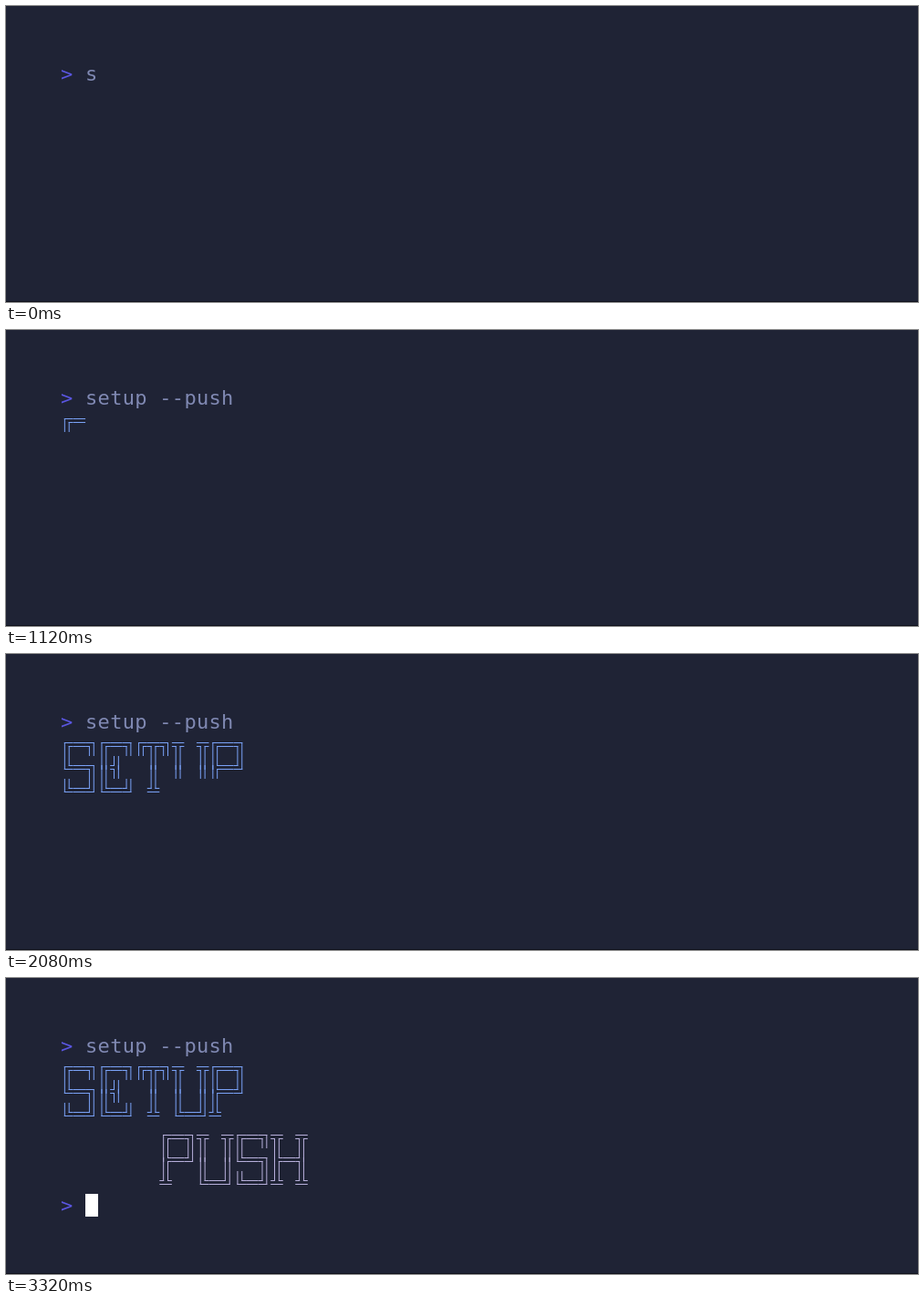
Recreate the animation shown at these times as an HTML page with a canvas. Size 1000 by 325 pixels, loop 6000 ms.

```html
<!DOCTYPE html>
<html lang="en">
<head>
<meta charset="utf-8">
<title>Terminal: setup --push</title>
<style>
  html, body { margin: 0; width: 100%; height: 100%; overflow: hidden; background: #1f2335; }
  canvas { display: block; }
</style>
</head>
<body>
<canvas id="stage" width="1000" height="325"></canvas>
<script>
const ctx = document.getElementById('stage').getContext('2d');
const LOOP = 6000, FRAME = 40;
const LEFT = 60, TOP = 62, CELL_W = 13.54, CELL_H = 25;
const COLORS = {
  background: '#1f2335', edge: '#10121c', prompt: '#5a56e0',
  text: '#8089b3', cursor: '#ffffff', setup: '#7aa2f7', push: '#b8b0dc'
};
const COMMAND = 'setup --push';
const OUTPUT_START = 1120, OUTPUT_END = 3320, CHAR_TIME = 24.86;

const BANNER = [
  '╔═╗╔═╗╔╦╗╦ ╦╔═╗',
  '╚═╗║╣  ║ ║ ║╠═╝',
  '╚═╝╚═╝ ╩ ╚═╝╩  ',
  '\t╔═╗╦ ╦╔═╗╦ ╦',
  '\t╠═╝║ ║╚═╗╠═╣',
  '\t╩  ╚═╝╚═╝╩ ╩'
];
const ARMS = {
  '═': 'LR', '║': 'UD', '╔': 'RD', '╗': 'LD', '╚': 'UR', '╝': 'UL',
  '╦': 'LRD', '╩': 'LRU', '╠': 'UDR', '╣': 'UDL'
};

// Output in printing order; a tab or line break takes one character's time.
const printed = BANNER.flatMap((line, i) => {
  let col = 0;
  return [...line, '\n'].map(char => {
    const item = { char, col, row: i + 1, color: i < 3 ? COLORS.setup : COLORS.push };
    col += char === '\t' ? 8 : 1;
    return item;
  });
});

const cellX = col => LEFT + col * CELL_W;
const cellY = row => TOP + row * CELL_H;

function drawText(text, col, row, color) {
  ctx.fillStyle = color;
  [...text].forEach((char, i) => ctx.fillText(char, cellX(col + i), cellY(row) + 20));
}

function drawCursor(col, row) {
  ctx.fillStyle = COLORS.cursor;
  ctx.fillRect(Math.floor(cellX(col)), cellY(row), 14, CELL_H);
}

// Each arm has two rails, which stop at the near rail of a crossing arm or run on to the far one.
function drawBoxChar({ char, col, row, color }) {
  const arms = ARMS[char];
  if (!arms) return;
  const x = cellX(col), y = cellY(row);
  const xs = [x + 4.35, x + 9.19], ys = [y + 10.5, y + 14.5];
  const has = arm => arms.includes(arm);
  ctx.strokeStyle = color;
  ctx.beginPath();
  for (const arm of arms) {
    const horizontal = arm === 'L' || arm === 'R';
    const near = arm === 'R' || arm === 'D' ? 1 : 0;
    [0, 1].forEach(side => {
      const crossing = has((horizontal ? 'UD' : 'LR')[side]);
      const stop = crossing ? near : 1 - near;
      const outward = near ? 0.5 : -0.5;
      if (horizontal) {
        ctx.moveTo(xs[stop] - (crossing ? outward : outward), ys[side]);
        ctx.lineTo(x + near * CELL_W, ys[side]);
      } else {
        ctx.moveTo(xs[side], ys[stop] - outward);
        ctx.lineTo(xs[side], y + near * CELL_H);
      }
    });
  }
  ctx.stroke();
}

function draw(time) {
  const t = Math.floor(time / FRAME) * FRAME;
  ctx.fillStyle = COLORS.background;
  ctx.fillRect(0, 0, 1000, 325);
  ctx.fillStyle = COLORS.edge;
  ctx.fillRect(0, 324, 1000, 1);
  ctx.font = '22px "DejaVu Sans Mono", monospace';
  ctx.lineWidth = 1;

  const typed = Math.min(COMMAND.length, Math.floor((t - 40) / 50) + 2);
  drawText('>', 0, 0, COLORS.prompt);
  drawText(COMMAND.slice(0, typed), 2, 0, COLORS.text);
  if (t > 0 && t < OUTPUT_START) drawCursor(2 + typed, 0);

  if (t >= OUTPUT_START) {
    const count = Math.floor((t - OUTPUT_START) / CHAR_TIME + 2.727);
    printed.slice(0, count).forEach(drawBoxChar);
  }
  if (t >= OUTPUT_END) {
    drawText('>', 0, 7, COLORS.prompt);
    drawCursor(2, 7);
  }
}

const start = performance.now();
function tick() {
  draw((performance.now() - start) % LOOP);
  requestAnimationFrame(tick);
}
tick();
</script>
</body>
</html>
```
